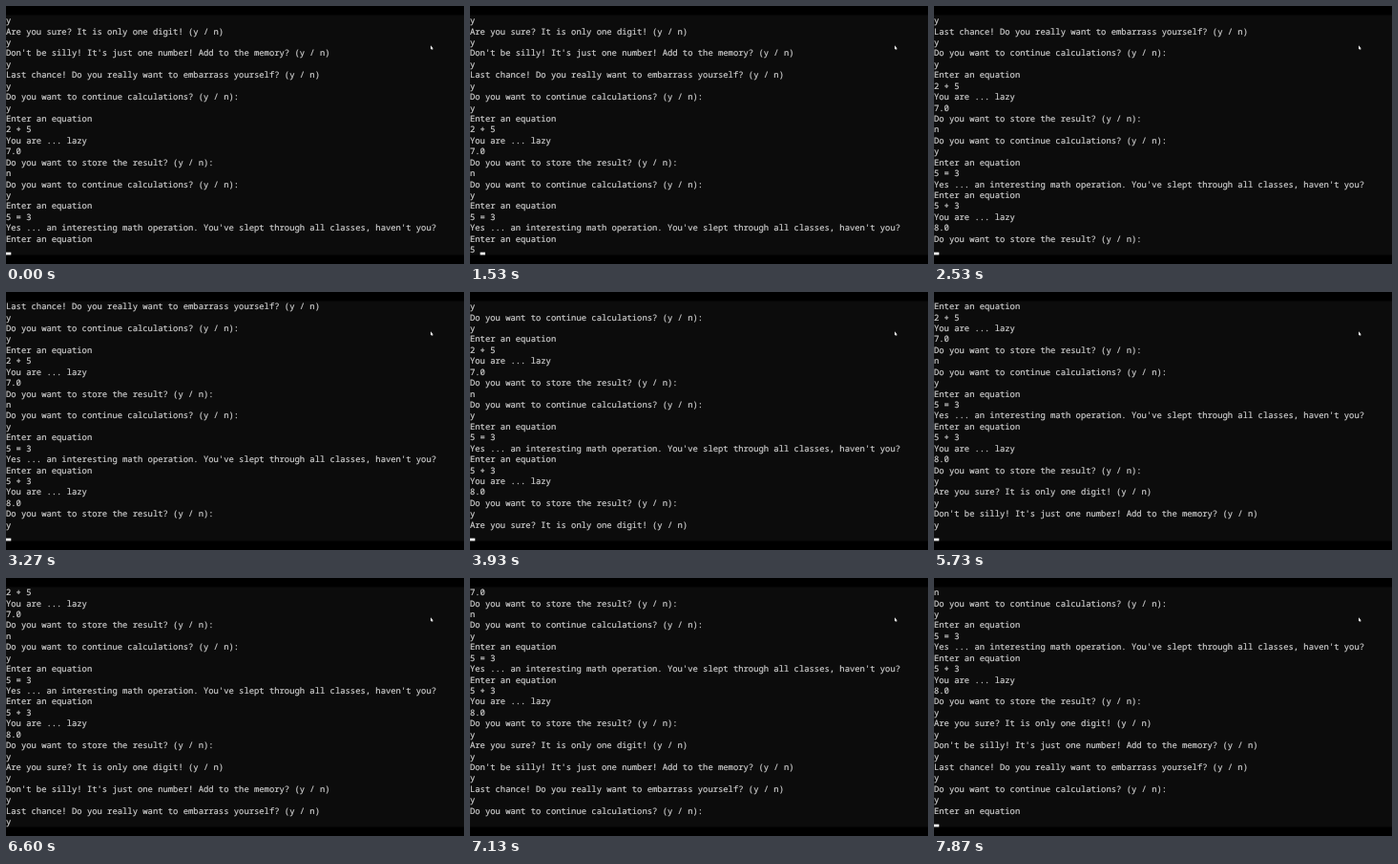
Animation of 480 by 270 pixels, one loop 8 s. Source, as an HTML page:

```html
<!DOCTYPE html>
<html lang="en">
<head>
<meta charset="utf-8">
<title>Console calculator</title>
<style>
  html, body { margin: 0; width: 100%; height: 100%; overflow: hidden; background: #000; }
  svg { display: block; width: 480px; height: 270px; }
  text {
    font: 8.86px "Noto Sans Mono", "DejaVu Sans Mono", monospace;
    fill: #d0d0d0;
    stroke: #d0d0d0;
    stroke-width: 0.18px;
    white-space: pre;
    text-rendering: geometricPrecision;
    font-variant-ligatures: none;
  }
</style>
</head>
<body>
<svg viewBox="0 0 480 270">
  <rect y="9.5" width="480" height="251" fill="#0c0c0c"/>
  <g id="screen"></g>
  <rect id="caret" y="257.7" width="5.3" height="2.8" fill="#f2f2f2"/>
  <path d="M445 41.2 V45.4 L446 44.7 L446.8 46 L447.4 45.7 L446.8 44.4 H447.9 Z" fill="#eee"/>
</svg>
<script>
const LOOP = 8000;
const ROWS = 22;
const PITCH = 11.43;
const BASELINE = 18.1;
const CHAR = 5.316;

const SURE = "Are you sure? It is only one digit! (y / n)";
const SILLY = "Don't be silly! It's just one number! Add to the memory? (y / n)";
const LAST = "Last chance! Do you really want to embarrass yourself? (y / n)";
const MORE = "Do you want to continue calculations? (y / n):";
const STORE = "Do you want to store the result? (y / n):";
const ENTER = "Enter an equation";
const LAZY = "You are ... lazy";

const log = [
  "y", SURE, "y", SILLY, "y", LAST, "y", MORE, "y",
  ENTER, "2 + 5", LAZY, "7.0", STORE, "n", MORE, "y",
  ENTER, "5 = 3",
  "Yes ... an interesting math operation. You've slept through all classes, haven't you?",
  ENTER, "5 + 3", LAZY, "8.0", STORE, "y", SURE, "y", SILLY, "y", LAST, "y",
  MORE, "y", ENTER
];

// time in ms, printed lines, typed input, caret shown
const steps = [
  [0, 21, "", 1], [200, 21, "", 0], [530, 21, "", 1], [730, 21, "", 0],
  [1000, 21, "", 1], [1270, 21, "", 0],
  [1400, 21, "5", 1], [1530, 21, "5 ", 1], [1800, 21, "5 ", 0],
  [1930, 21, "5 +", 1], [2070, 21, "5 + ", 1], [2200, 21, "5 + 3", 1],
  [2530, 25, "", 1], [2870, 25, "", 0], [3130, 25, "", 1], [3200, 25, "y", 1],
  [3270, 26, "", 1], [3330, 27, "", 1], [3670, 27, "", 0], [3930, 27, "", 1],
  [4200, 27, "", 0], [4270, 27, "y", 1],
  [4400, 29, "", 1], [4730, 29, "", 0], [5000, 29, "", 1], [5270, 29, "", 0],
  [5530, 29, "", 1], [5600, 29, "y", 1],
  [5730, 30, "", 1], [5800, 31, "", 1], [6070, 31, "", 0],
  [6270, 31, "y", 1], [6600, 31, "y", 0],
  [6800, 33, "", 1], [7130, 33, "", 0], [7400, 33, "", 1], [7670, 33, "y", 1],
  [7870, 35, "", 1]
];

const screen = document.getElementById("screen");
const caret = document.getElementById("caret");
const rows = Array.from({ length: ROWS }, (_, i) => {
  const row = document.createElementNS(screen.namespaceURI, "text");
  row.setAttribute("x", 0);
  row.setAttribute("y", (BASELINE + i * PITCH).toFixed(2));
  return screen.appendChild(row);
});

let shown = null;

function show(step) {
  if (step === shown) return;
  shown = step;
  const [, count, typed, caretOn] = step;
  const visible = [...log.slice(count - ROWS + 1, count), typed];
  rows.forEach((row, i) => { row.textContent = visible[i]; });
  caret.setAttribute("x", typed.length * CHAR);
  caret.setAttribute("visibility", caretOn ? "visible" : "hidden");
}

const start = performance.now();

function tick() {
  const time = (performance.now() - start) % LOOP;
  show(steps.findLast(([at]) => at <= time));
  requestAnimationFrame(tick);
}

tick();
</script>
</body>
</html>
```
